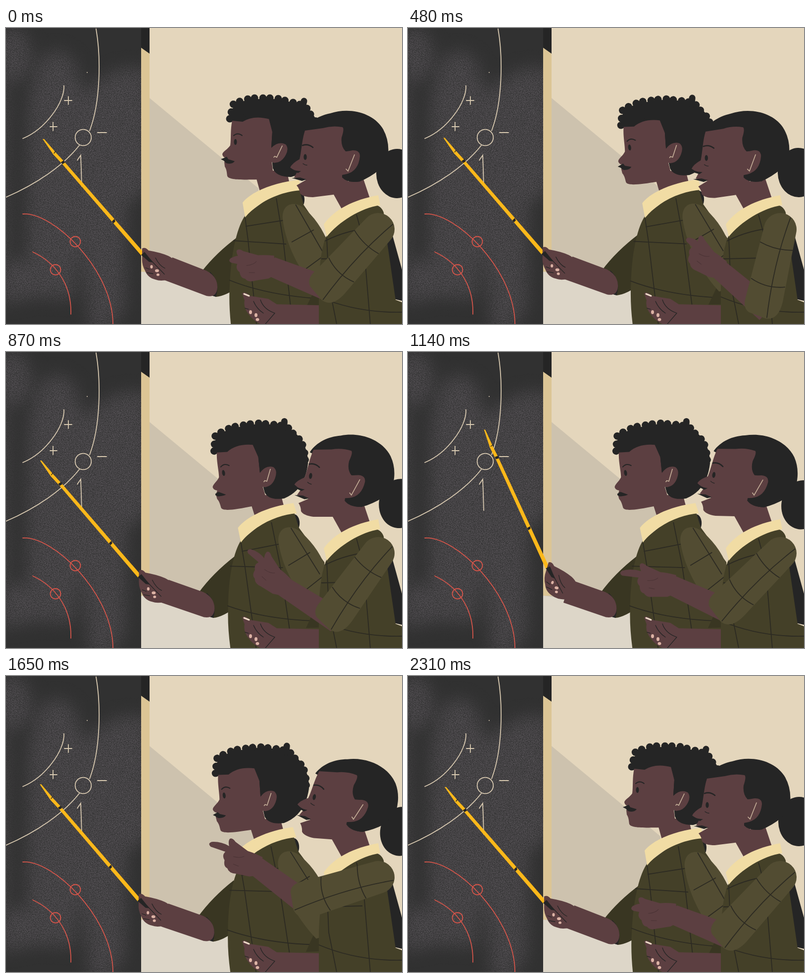
These frames come from a looping animation (800 by 600 pixels, 2.34 s). An HTML page:

```html
<!DOCTYPE html>
<html lang="en">
<head>
<meta charset="utf-8">
<title>At the blackboard</title>
<style>
  html, body { margin: 0; width: 100%; height: 100%; overflow: hidden; background: #e4d6bc; }
  svg { position: absolute; left: 0; top: 0; width: 800px; height: 600px; will-change: transform; }
  .skin { fill: #5c3f41; }
  .ink { fill: #252525; }
  .knit { fill: #444028; }
  .sleeve { fill: #524c32; }
  .shade { fill: #393622; }
  .collar { fill: #f1dca4; }
  .nail { fill: #dcb2a4; }
  .line { fill: none; stroke: #252525; stroke-width: 2; stroke-linecap: round; stroke-linejoin: round; }
  .thin { stroke-width: 1.3; }
  .plaid { fill: none; stroke: #2c2a22; stroke-width: 1.8; }
  .chalk { fill: none; stroke: #d8c9b0; stroke-width: 1.8; stroke-linecap: round; }
  .red { stroke: #d4554a; }
  .ear { fill: none; stroke: #c3ad97; stroke-width: 1.7; stroke-linecap: round; }
  .curls { fill: none; stroke: #252525; stroke-width: 15; stroke-linecap: round; stroke-dasharray: 0 14 0 17; }
</style>
</head>
<body>
<!-- room and blackboard -->
<svg viewBox="0 0 800 600">
  <defs>
    <filter id="grain" filterUnits="userSpaceOnUse" x="0" y="0" width="273" height="600" color-interpolation-filters="sRGB">
      <feGaussianBlur stdDeviation="16" result="soft"/>
      <feTurbulence type="fractalNoise" baseFrequency=".8" numOctaves="2" seed="4"/>
      <feColorMatrix values="0 0 0 0 0  0 0 0 0 0  0 0 0 0 0  3.6 0 0 0 -1.250" result="noise"/>
      <feComposite in="soft" in2="noise" operator="in"/>
    </filter>
  </defs>
  <path fill="#e4d6bc" d="M0 0H800V600H0Z"/>
  <path fill="#cdc2ae" d="M290 142L510 325V600H273V450H290Z"/>
  <path fill="#ddd6c8" d="M273 494L470 517V600H273Z"/>
  <path fill="#dcc595" d="M273 30H290V494H273Z"/>
  <path class="ink" d="M273 0H290V52L273 40Z"/>
  <path fill="#313131" d="M0 0H273V600H0Z"/>
  <g filter="url(#grain)" fill="#565256">
    <ellipse cx="14" cy="55" rx="36" ry="55"/>
    <path d="M45 150L65 70Q105 20 142 75L154 130L190 105Q230 70 290 85V320L244 360L240 570L200 620H172L150 440L135 550L60 545L-10 560V475L42 470Z"/>
    <path d="M-20 110H2V470H-20Z"/>
  </g>
  <g class="chalk">
    <path d="M182 2C192 60 191 150 169 208M148 238C115 280 60 317 0 343M117 117C119 150 80 205 34 224"/>
    <circle cx="156" cy="222" r="16.3"/>
    <path d="M118 147h15M126 139v16M89 200h14M95 191v17M185 212h18M144 268L151 258L153 321"/>
    <path d="M164 90v.3"/>
    <g class="red">
      <circle cx="140" cy="433" r="10.5"/>
      <circle cx="100" cy="490" r="10.5"/>
      <path d="M34 377C95 372 216 490 216 600M54 454C100 475 133 520 131 580"/>
    </g>
  </g>
</svg>

<!-- people -->
<svg viewBox="0 0 800 600">
  <g id="reach">
    <path class="shade" d="M470 422Q425 455 395 494Q418 510 424 545Q445 543 470 524Z"/>
    <path class="ink" d="M412 494Q434 515 424 545L408 540Z"/>
    <path class="skin" d="M336 465L405 492Q428 504 427 527Q425 547 405 543L320 511Z"/>
    <g id="pointer">
      <path fill="#fcb81a" d="M74 225L77 225L102 254L117 270L279 456L273 461L112 274L96 257Z"/>
      <path class="line thin" d="M97 254L100 250"/>
      <path class="ink" d="M111 272L117 268L119 273L114 276ZM214 392L219 387L221 392L217 396Z"/>
      <path class="skin" d="M275 447Q281 443 288 451Q312 455 328 462Q347 471 345 490L328 510Q312 514 302 510Q286 506 281 492Q274 480 275 466Z"/>
      <path class="ink" d="M273 460L280 454L297 475L289 474Z"/>
      <path class="line thin" d="M291 469L320 499M302 466Q310 482 321 487M282 486L290 489M285 496L297 498"/>
      <g class="nail">
        <ellipse cx="294" cy="484" rx="2.600" ry="3.400"/>
        <ellipse cx="305" cy="492" rx="4" ry="3"/>
        <ellipse cx="307" cy="500" rx="3" ry="2.600"/>
      </g>
    </g>
  </g>

  <g id="manBody">
    <path class="skin" d="M503 295L514 335L574 320L566 285Z"/>
    <ellipse class="ink" cx="593" cy="348" rx="10" ry="17"/>
    <path class="knit" d="M483 380C468 402 455 450 452 520Q449 570 458 630H650V430L601 358L592 324L540 337Z"/>
    <path class="plaid" d="M483 384L489 430L507 610M546 345L560 430L580 610M484 402L560 390M459 431L566 438M451 511Q530 543 640 549"/>
    <path class="shade" d="M634 510L608 562H645V510Z"/>
    <path class="sleeve" d="M559 388C556 358 579 350 598 362C622 381 641 408 652 440V530L630 536C600 502 566 446 559 388Z"/>
    <path class="plaid" d="M577 434L622 409M585 358Q610 402 640 454M606 488L644 460"/>
    <path class="collar" d="M478 354C497 330 546 312 592 308L598 329C560 330 511 350 483 384Z"/>
  </g>

  <g id="manHead">
    <path class="ink" d="M451 190L456 165L470 150L500 144L550 144L600 156L622 178Q641 205 635 240Q620 292 576 302Q545 302 539 284L530 196Z"/>
    <path class="curls" d="M452 184L455 171L458 155L476 147L497 142L545 142L588 153L606 160L617 178L629 193L632 212L630 240"/>
    <path class="curls" d="M461 182L520 181"/>
    <path class="line" d="M602 148L599 160" style="stroke-width:13"/>
    <path class="skin" d="M457 188C453 205 455 225 453 238C448 246 438 250 437 256Q438 262 445 264L441 272L442 281C446 287 446 293 447 300C450 308 475 308 512 307L540 296L537 272L560 262L555 234L536 242L538 210L533 185Q500 176 478 190Z"/>
    <path class="skin" d="M536 242Q551 229 565 236Q573 245 563 261Q554 275 539 273L533 262Z"/>
    <path class="ink" d="M530 180H550L556 232Q546 233 536 243L538 211Z"/>
    <ellipse class="ink" cx="463.500" cy="231" rx="3" ry="6"/>
    <path class="line" d="M460 218Q468 211 477 218"/>
    <path class="ear" d="M541 262L543 260L547 262L558 239"/>
    <path class="ink" id="manLips"/>
  </g>

  <path class="skin" d="M477 538Q483 533 493 543L530 549L547 560L634 562V600H514Q500 594 490 580Q479 566 482 552Z"/>
  <path class="line thin" d="M514 551Q520 570 543 578M500 554Q507 570 520 578M543 578L524 600M483 568L490 570"/>
  <path d="M481 539L491 543" stroke="#ecd9c6" stroke-width="3" stroke-linecap="round"/>
  <g class="nail">
    <ellipse cx="494" cy="576" rx="3" ry="4"/>
    <ellipse cx="505" cy="582" rx="3" ry="4"/>
    <ellipse cx="508" cy="591" rx="3.500" ry="3"/>
  </g>

  <path class="ink" d="M760 400L778 410L800 490V553L770 546Z"/>
  <path class="skin" d="M655 325L680 370L735 345L720 300Z"/>
  <path class="knit" d="M648 420Q634 450 632 520V600H800V556L787 551L768 420L763 374Q758 360 745 359L690 380Z"/>
  <path class="plaid" d="M708 378L722 430L736 600M648 425L652 520L668 600M637 468L720 466M644 432Q690 408 750 404M632 545Q710 578 800 576"/>
  <path class="collar" d="M642 398C663 368 702 348 752 339L756 359C716 365 672 393 648 423Z"/>

  <g id="womanHead">
    <ellipse class="ink" cx="790" cy="295" rx="42" ry="50"/>
    <path class="ink" d="M597 214C608 192 630 178 655 173C695 160 740 172 760 202Q775 226 772 258L755 287Q735 303 715 311Q690 315 679 301L670 240Z"/>
    <path class="skin" d="M604 208C598 225 597 250 593 266Q578 274 574 283L588 292L582 303L606 308L587 319Q593 326 594 335Q600 343 620 343L660 338L700 330L686 300L679 298L688 296Q712 290 715 260Q715 247 700 248Q690 250 686 250Q676 240 678 222Q684 204 680 201Q660 197 640 203Z"/>
    <path class="ink" d="M679 298L690 297L716 300V311Q690 315 679 303Z"/>
    <path class="ink" d="M571 279Q578 290 596 290L590 294L574 289ZM577 304L594 303L607 307L598 310Z"/>
    <ellipse class="ink" cx="604.500" cy="261.500" rx="3.200" ry="6"/>
    <path class="line" d="M599 238Q610 234 620 242" style="stroke-width:2.600"/>
    <path class="line thin" d="M600 275Q604 278 608 278"/>
    <path class="ear" d="M687 286L691 290L704 257"/>
  </g>

  <path class="skin" id="forearm" d="M14 -24L-116 -19Q-124 0 -114 21L14 25Z"/>
  <g id="hand">
    <path class="skin" id="fist"/>
    <path class="line" d="M-48 -8Q-34 -7 -27 -13M-45 7L-34 9" style="stroke-width:1;stroke:#4a3335"/>
  </g>
  <g id="upperArm">
    <path class="sleeve" d="M0 -33L142 -38Q181 -38 183 -12L178 24Q172 39 148 37L0 33A33 33 0 0 1 0 -33Z"/>
    <path class="plaid" d="M-28 -15Q70 -2 181 -14M36 -34Q44 0 34 34M112 -36Q124 0 110 35"/>
  </g>
</svg>

<script>
const LOOP = 2340, CYCLE = 2310;
const times = [0, 480, 870, 1140, 1650, 2010];
const n = times.length;

// One value per entry of times
const tracks = {
  sway:      [0, .5, 1, 1, 1.1, 1.1],
  swing:     [0, 0, 0, 1, 0, 0],
  manShift:  [0, -14, -22, -22, -21, -18.5],
  manTilt:   [0, -7.5, -9.5, -9.5, -7.5, -5],
  manMouth:  [1, .9, 0, 0, .7, .6],
  womanTilt: [0, -1.2, 7, 8.5, 11.4, 5],
  upper:     [132.5, 103, 126, 135, 163, 140],
  fore:      [202, 221, 213, 205, 217, 207],
  wrist:     [-9, 27, 32, 0, 12, 6],
  finger:    [.4, .5, .85, 1, .95, .75],
};

// Periodic cubic through the keys, flat at each extreme
function sample(keys, t) {
  const value = i => keys[(i + n) % n];
  const time = i => times[(i + n) % n] + CYCLE * Math.floor(i / n);
  const slope = i => {
    const before = value(i) - value(i - 1), after = value(i + 1) - value(i);
    return before * after <= 0 ? 0 : (before + after) / (time(i + 1) - time(i - 1));
  };
  let i = n - 1;
  while (times[i] > t) i--;
  const span = time(i + 1) - time(i), u = (t - time(i)) / span, v = 1 - u;
  return v * v * ((1 + 2 * u) * value(i) + u * span * slope(i)) +
         u * u * ((3 - 2 * u) * value(i + 1) - v * span * slope(i + 1));
}

const $ = id => document.getElementById(id);
const move = (id, value) => $(id).setAttribute('transform', value);
const shape = (id, d) => $(id).setAttribute('d', d);
const polar = ([x, y], length, degrees) => {
  const a = degrees * Math.PI / 180;
  return [x + length * Math.cos(a), y + length * Math.sin(a)];
};

function draw(now) {
  const t = Math.min(now % LOOP, CYCLE - .01);
  const p = {};
  for (const name in tracks) p[name] = sample(tracks[name], t);

  move('manBody', `rotate(${-2.1 * p.sway} 540 615)`);
  move('reach', `translate(${-7 * p.sway} ${-2 * p.sway}) rotate(${-1.7 * p.sway} 290 480)`);
  move('pointer', `rotate(${2 * p.sway + 16 * p.swing} 342 493)`);
  move('manHead', `translate(${p.manShift}) rotate(${p.manTilt} 548 250)`);
  move('womanHead', `rotate(${p.womanTilt} 694 345)`);

  const mix = (shut, open) => shut + (open - shut) * p.manMouth;
  shape('manLips', `M${mix(440, 434)} ${mix(270, 266)}L${mix(447, 446)} ${mix(267, 261)}` +
    `L${mix(452, 449)} ${mix(270, 266)}L${mix(461, 462)} ${mix(275, 270)}` +
    `Q457 277 445 ${mix(276, 274)}L440 ${mix(273, 269)}Z`);

  const shoulder = [752, 408];
  const elbow = polar(shoulder, 160, p.upper);
  const wrist = polar(elbow, 118, p.fore);
  move('upperArm', `translate(${shoulder}) rotate(${p.upper})`);
  move('forearm', `translate(${elbow}) rotate(${p.fore - 180})`);
  move('hand', `translate(${wrist}) rotate(${p.wrist})`);
  const tip = -62 - 37 * p.finger;
  shape('fist', `M10 -19Q-8 -24 -22 -25L-50 -38Q-59 -46 -63 -41Q-65 -36 -61 -27Q${tip + 18} -33 ${tip} -28` +
    `Q${tip - 8} -23 ${tip} -18L-66 -14Q-72 -5 -64 3Q-64 16 -55 18Q-50 27 -36 25L-8 25L8 19Z`);
}

function tick() {
  draw(performance.now());
  requestAnimationFrame(tick);
}
tick();
</script>
</body>
</html>
```
